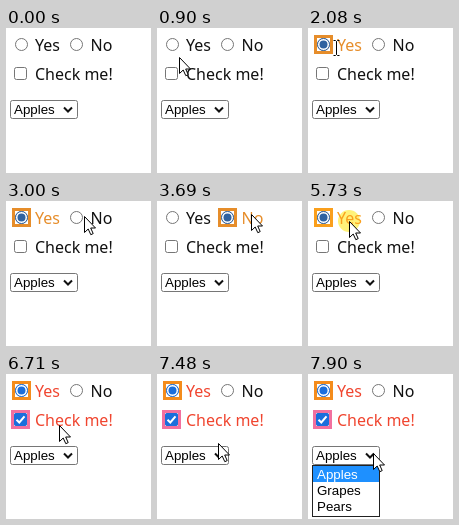
An HTML page that plays this animation: 145x145 px, repeating every 8 s.

```html
<!DOCTYPE html>
<html lang="en">
<head>
<meta charset="utf-8">
<title>Form controls</title>
<style>
  html, body { margin: 0; width: 100%; height: 100%; overflow: hidden; background: #fff; }
  svg { display: block; width: 100vw; height: 100vh; }
  .label { font: 16px "Noto Sans", "Open Sans", sans-serif; }
  .option { font: 13.333px "Liberation Sans", Arial, sans-serif; }
  .outline { fill: none; stroke: #767676; }
  .ring { fill: none; stroke: var(--ring); stroke-width: 3; }
  .blue { fill: var(--blue); }
  .blueLine { fill: #fff; stroke: var(--blue); }
</style>
</head>
<body>
<svg id="stage" viewBox="0 0 145 145">
  <defs>
    <g id="radioOn">
      <rect class="ring" x="-8" y="-8" width="16" height="16"/>
      <circle class="blueLine" r="6"/>
      <circle class="blue" r="4"/>
    </g>
  </defs>
  <circle id="press" r="11" fill="#fff27a"/>

  <circle class="outline" cx="15.5" cy="16.5" r="6"/>
  <use id="yesOn" href="#radioOn" x="15.5" y="16.5"/>
  <text id="yes" class="label" x="29" y="23">Yes</text>

  <circle class="outline" cx="70.5" cy="16.5" r="6"/>
  <use id="noOn" href="#radioOn" x="70.5" y="16.5"/>
  <text id="no" class="label" x="84.5" y="23">No</text>

  <rect class="outline" x="8.5" y="39.5" width="12" height="12" rx="2"/>
  <g id="checkOn">
    <rect x="6.5" y="37.5" width="16" height="16" fill="none" stroke="#f2709f" stroke-width="3"/>
    <rect class="blue" x="8" y="39" width="13" height="13" rx="2"/>
    <path d="M10.5 45.7L13.3 48.5L18.5 42.3" fill="none" stroke="#fff" stroke-width="2"/>
  </g>
  <text id="check" class="label" x="29" y="52">Check me!</text>

  <rect class="outline" x="4.5" y="72.5" width="67" height="18" rx="2"/>
  <text class="option" x="8" y="86">Apples</text>
  <path d="M58 79.5L62 83.5L66 79.5" fill="none" stroke="#111" stroke-width="2"/>

  <g id="listOn">
    <rect x="4.5" y="91.5" width="67" height="51" fill="#fff" stroke="#222"/>
    <rect x="5" y="92" width="66" height="16" fill="#1e90ff"/>
    <text class="option" x="9" y="104.5" fill="#fff">Apples</text>
    <text class="option" x="9" y="121">Grapes</text>
    <text class="option" x="9" y="137">Pears</text>
  </g>

  <g id="cursor">
    <path id="arrow" d="M.5 .5V16.5L4.2 13L6.8 18.7L9.2 17.6L6.7 12H11.5Z" fill="#fff" stroke="#000"/>
    <path id="beam" d="M-3 -7.5H-1L0 -6.5L1 -7.5H3M0 -6.5V6.5M-3 7.5H-1L0 6.5L1 7.5H3" fill="none" stroke="#000"/>
  </g>
</svg>
<script>
const LOOP = 8000, PICK_DELAY = 90, PRESS_TIME = 140;
const $ = id => document.getElementById(id);
const show = (id, on) => $(id).style.display = on ? "" : "none";

// Where the pointer goes, and what it clicks there
const entry = { x: 82, y: 138 };
const stops = [
  { x: 15, y: 17, leave: 70, arrive: 1100, press: 1320, pick: "yes" },
  { x: 28, y: 20, leave: 1960, arrive: 2080 },
  { x: 94, y: 13, leave: 2100, arrive: 3430, press: 3540, pick: "no" },
  { x: 70, y: 20, leave: 3900, arrive: 4180, press: 4320, pick: "no" },
  { x: 41, y: 20, leave: 4670, arrive: 5520, press: 5630, pick: "yes" },
  { x: 53, y: 51, leave: 5870, arrive: 6430, press: 6560, pick: "check" },
  { x: 65, y: 79, leave: 7270, arrive: 7620, press: 7740, pick: "list" }
];

function pointer(t) {
  let { x, y } = entry;
  for (const s of stops) {
    const k = Math.min(1, Math.max(0, (t - s.leave) / (s.arrive - s.leave)));
    const ease = k * k * (3 - 2 * k);
    x += (s.x - x) * ease;
    y += (s.y - y) * ease;
  }
  return [Math.round(x), Math.round(y)];
}

function draw(t) {
  const picked = stops.filter(s => t >= s.press + PICK_DELAY).map(s => s.pick);
  const radio = picked.filter(p => p === "yes" || p === "no").pop();
  const check = picked.includes("check");
  const again = radio === "yes" && picked.includes("no");
  const ring = check ? "#f48c1c" : again ? "#fa9f1c" : "#e68d2a";
  const accent = check ? "#f0452f" : ring;

  $("stage").style.setProperty("--ring", ring);
  $("stage").style.setProperty("--blue", check ? "#1a6edc" : "#2f62a0");
  const on = { yes: radio === "yes", no: radio === "no", check };
  for (const id in on) {
    show(id + "On", on[id]);
    $(id).setAttribute("fill", on[id] ? accent : "#111");
  }
  show("listOn", picked.includes("list"));

  const [x, y] = pointer(t);
  const gap = x % 55;  // both radios share the same spacing
  const overGap = y < 29 && gap >= 25 && gap < 29;
  show("cursor", t >= stops[0].leave);
  show("arrow", !overGap);
  show("beam", overGap);
  $("cursor").setAttribute("transform", `translate(${overGap ? x + .5 : x} ${y})`);
  show("press", stops.some(s => t >= s.press && t < s.press + PRESS_TIME));
  $("press").setAttribute("cx", x);
  $("press").setAttribute("cy", y);
}

const start = performance.now();
function tick() {
  draw((performance.now() - start) % LOOP);
  requestAnimationFrame(tick);
}
tick();
</script>
</body>
</html>
```
